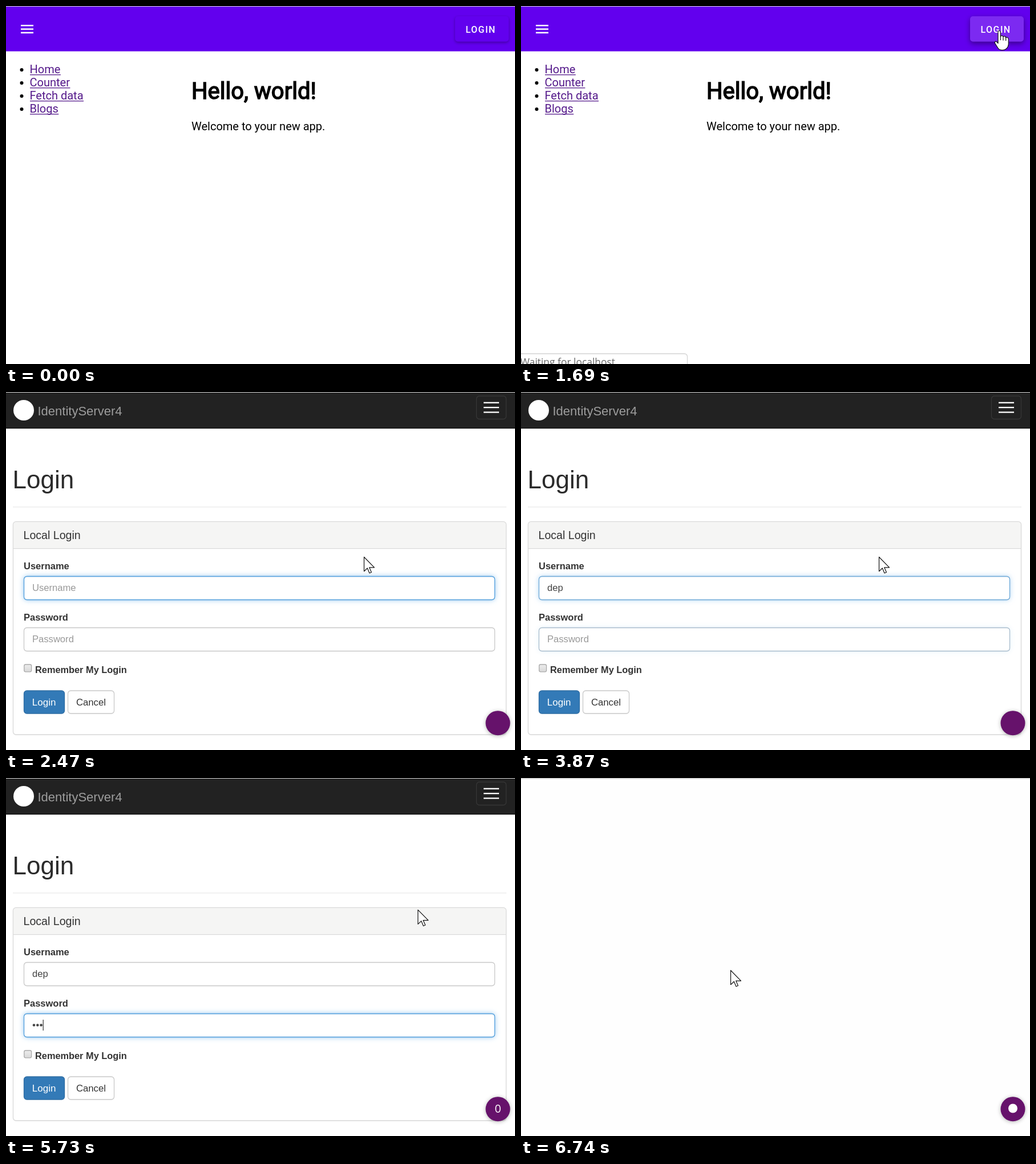
An HTML page with a canvas for the animation above (8000 ms loop, 892x628 px).

```html
<!DOCTYPE html>
<html lang="en">
<head>
<meta charset="utf-8">
<title>Login flow</title>
<style>
html, body { margin: 0; width: 100%; height: 100%; overflow: hidden; background: #fff; }
canvas { display: block; }
</style>
</head>
<body>
<canvas id="stage" width="892" height="628"></canvas>
<script>
const ctx = document.getElementById('stage').getContext('2d');
const W = 892, H = 628, LOOP = 8000;
const SANS = '"Liberation Sans", Arial, sans-serif';
const ROBOTO = 'Roboto, sans-serif';
const USER = 'dep';

// Share of a move done at time t, in n equal jumps; the first falls on a, the last on b.
function jumps(t, a, b, n) {
  if (t < a) return 0;
  return Math.min(n, Math.floor((t - a) / ((b - a) / (n - 1)) + 0.06) + 1) / n;
}
const ease = k => k * k * (3 - 2 * k);
const within = (t, a, b) => t >= a && t < b;
const ramp = (t, a, b) => Math.max(0, Math.min(1, (t - a) / (b - a)));

function rect(x, y, w, h, color) {
  ctx.fillStyle = color;
  ctx.fillRect(x, y, w, h);
}

function disc(x, y, r, color) {
  ctx.fillStyle = color;
  ctx.beginPath();
  ctx.arc(x, y, r, 0, Math.PI * 2);
  ctx.fill();
}

function text(str, x, y, font, color, spacing = 0) {
  ctx.font = font;
  ctx.fillStyle = color;
  ctx.letterSpacing = spacing + 'px';
  ctx.fillText(str, x, y);
  ctx.letterSpacing = '0px';
}

// Rounded box between two corners, with an optional border and shadow.
function box(x0, y0, x1, y1, r, fill, border, shadow) {
  ctx.save();
  ctx.beginPath();
  ctx.roundRect(x0, y0, x1 - x0, y1 - y0, r);
  if (shadow) {
    ctx.shadowColor = shadow.color;
    ctx.shadowBlur = shadow.blur;
    ctx.shadowOffsetY = shadow.dy || 0;
  }
  if (fill) {
    ctx.fillStyle = fill;
    ctx.fill();
  }
  ctx.shadowColor = 'transparent';
  if (border) {
    ctx.strokeStyle = border;
    ctx.lineWidth = 1.3;
    ctx.stroke();
  }
  ctx.restore();
}

function homePage(t) {
  rect(0, 0, W, H, '#fff');
  rect(0, 1, W, 78.5, '#6200ee');
  for (let i = 0; i < 3; i++) rect(26, 33 + i * 6.3, 22, 2.5, '#fff');

  const hover = Math.max(jumps(t, 740, 980, 4) * (t >= 740), 0);
  const press = within(t, 1520, 1840) ? 0.16 - 0.08 * ramp(t, 1600, 1690) : 0;
  box(787, 18, 881, 62.5, 5, '#6200ee', null,
    { color: `rgba(0,0,0,${0.32 + 0.1 * hover})`, blur: 5 + 5 * hover, dy: 2 + 1.5 * hover });
  box(787, 18, 881, 62.5, 5, `rgba(255,255,255,${0.085 * hover + press})`);
  text('LOGIN', 805.5, 46.5, '500 16px ' + ROBOTO, '#fff', 1.43);

  ['Home', 'Counter', 'Fetch data', 'Blogs'].forEach((label, i) => {
    const y = 118 + i * 23;
    disc(27.5, y - 6, 3, '#000');
    text(label, 41.5, y, '20px ' + ROBOTO, '#551a8b');
    rect(42, y + 2, ctx.measureText(label).width, 1.3, '#551a8b');
  });

  text('Hello, world!', 325, 163, '40px ' + ROBOTO, '#000');
  ctx.strokeStyle = '#000';
  ctx.lineWidth = 1.5;
  ctx.strokeText('Hello, world!', 325, 163);
  text('Welcome to your new app.', 325, 218, '20px ' + ROBOTO, '#000');
}

function statusBubble() {
  box(-8, 610, 291.5, 640, 5, '#fff', '#d4d4d4');
  text('Waiting for localhost...', -1, 631, '17.4px "Open Sans", sans-serif', '#6a6a6a');
}

function scrollbar() {
  rect(870, 1, 22, H, '#f1f1f1');
  rect(871, 27, 21, 560, '#c1c1c1');
  ctx.fillStyle = '#a3a3a3';
  ctx.beginPath();
  ctx.moveTo(876, 18);
  ctx.lineTo(882, 12);
  ctx.lineTo(888, 18);
  ctx.fill();
  ctx.fillStyle = '#505050';
  ctx.beginPath();
  ctx.moveTo(876, 624.5);
  ctx.lineTo(888, 624.5);
  ctx.lineTo(882, 630);
  ctx.fill();
}

function field(y, right, focus) {
  const glow = { color: `rgba(102,175,233,${0.75 * focus})`, blur: 10 };
  box(31.5, y, right - 0.5, y + 41, 5, '#fff', '#c8c8c8', focus ? glow : null);
  if (focus) box(31.5, y, right - 0.5, y + 41, 5, null, `rgba(84,164,228,${focus})`);
}

function caret(x, y) {
  rect(x, y, 1.2, 19, '#333');
}

function suggestion() {
  box(31.5, 366, 322, 447, 2, '#fff', '#c8c8c8', { color: 'rgba(0,0,0,.2)', blur: 5, dy: 1 });
  text(USER, 46, 399, '16.5px ' + SANS, '#333');
  for (let i = 0; i < 3; i++) disc(49 + i * 6.4, 424, 2.2, '#777');
}

function loginPage(t) {
  const bar = t < 1920;
  const edge = bar ? 851.5 : 877;
  const right = edge - 20;
  const bold = 'bold 16.5px ' + SANS, body = '16.6px ' + SANS;

  rect(0, 0, W, H, '#fff');
  rect(0, 1, W, 62, '#222');
  rect(0, 63, W, 1.2, '#080808');
  disc(31, 32, 18, '#fff');
  text('IdentityServer4', 55.5, 40.5, '22px ' + SANS, '#9d9d9d');
  box(edge - 52.5, 7, edge - 0.5, 47.5, 5, null, '#363636');
  for (let i = 0; i < 3; i++) rect(edge - 40, 17.6 + i * 8.4, 27, 2.3, '#fff');

  text('Login', 11.5, 169, '44px ' + SANS, '#2b2b2b');
  rect(12, 201, edge - 12, 1.3, '#eaeaea');

  box(12.5, 227.5, edge - 0.5, 601, 5, '#fff', '#d9d9d9', { color: 'rgba(0,0,0,.06)', blur: 2, dy: 1 });
  box(13, 228, edge - 1, 274, [5, 5, 0, 0], '#f5f5f4');
  rect(12, 274, edge - 12, 1.2, '#d9d9d9');
  text('Local Login', 30.5, 258, '19.6px ' + SANS, '#333');

  // Focus goes from the user field to the password, then to the button.
  const swap = jumps(t, 3870, 4100, 4);
  const userFocus = ramp(t, 1920, 2160) * (1 - swap);
  const passFocus = swap * (1 - ramp(t, 6300, 6450));

  text('Username', 31, 311, bold, '#333');
  field(323.5, right, userFocus);
  const typed = USER.slice(0, (t >= 3310) + (t >= 3480) + (t >= 3550));
  if (typed) text(typed, 46, 349, body, '#444');
  else text('Username', 46, 349, body, '#999');
  if (within(t, 2990, 3870)) caret(typed ? 46.5 + ctx.measureText(typed).width : 46.5, 335);

  text('Password', 31, 401, bold, '#333');
  field(413.5, right, passFocus);
  const dots = (t >= 4430) + (t >= 4570) + (t >= 4650);
  if (!dots) text('Password', 46, 439, body, '#999');
  for (let i = 0; i < dots; i++) disc(49 + i * 6.3, 433.5, 2.3, '#444');
  if (within(t, 4430, 5200) || within(t, 5730, 6300)) caret(46 + dots * 6.2, 424);

  const shade = ctx.createLinearGradient(0, 477, 0, 491);
  shade.addColorStop(0, '#eee');
  shade.addColorStop(1, '#d8d8d8');
  box(31.8, 478, 44.6, 490.8, 2.5, shade, '#a9a9a9');
  text('Remember My Login', 51, 493, 'bold 16.35px ' + SANS, '#333');

  const hot = t >= 6220;
  box(31.5, 524, 102.5, 564, 5, hot ? '#286090' : '#337ab7', hot ? '#204d74' : '#2e6da4');
  text('Login', 45.8, 550, '17px ' + SANS, '#fff');
  box(108.5, 524, 189.5, 564, 5, '#fff', '#c8c8c8');
  text('Cancel', 123, 550, '16.7px ' + SANS, '#333');

  if (within(t, 3310, 3550)) suggestion();
  if (bar) scrollbar();
  if (t < 2000) statusBubble();
}

function blankPage() {
  rect(0, 0, W, H, '#fefefe');
  rect(0, 1, W, 1, '#d6d6d6');
}

function badge(t) {
  ctx.save();
  ctx.shadowColor = 'rgba(0,0,0,.3)';
  ctx.shadowBlur = 7;
  ctx.shadowOffsetY = 1;
  disc(862, 580.7, 21.5, '#66126b');
  ctx.restore();
  if (t >= 6590) disc(862, 579.5, 8, '#fff');
  else if (t >= 4025) text('0', 856.4, 587, '19.5px "Open Sans", sans-serif', '#fff');
}

function outline(path, x, y) {
  ctx.save();
  ctx.translate(x, y);
  ctx.fillStyle = '#fff';
  ctx.strokeStyle = '#111';
  ctx.lineWidth = 1.2;
  ctx.lineJoin = 'round';
  ctx.fill(path);
  ctx.stroke(path);
  ctx.restore();
}

const ARROW = new Path2D('M.5.5V25.5L6.3 20 10 28.7 13.4 27.2 9.7 18.8H18.5Z');
const HAND = new Path2D('M-2 21V2.5Q-2 .5 0 .5T2.3 2.5V11Q2.8 9 4.7 9T7 11.5' +
  'Q7.5 10 9.3 10T11.7 13Q12.2 11.6 14 12T16.3 15V24Q16 28 13.5 31Q10 34.6 5 34.4' +
  'Q0 34.3-2.3 30.5L-7 23Q-8.6 20.2-6.6 19.2-5 18.6-2 22.5Z');
const KNUCKLES = new Path2D('M2.3 11V17M7 12V17.5M11.7 13V18');

// Each move: start, end, number of jumps, target point.
const MOVES = [
  [280, 740, 7, 814, 51],
  [910, 980, 2, 815, 54],
  [1140, 1290, 3, 838, 43],
  [1920, 2470, 8, 627, 289],
  [5200, 5270, 2, 759, 213],
  [5730, 6220, 7, 81, 535],
  [6440, 6740, 5, 367, 337]
];

function cursor(t) {
  if (t < 280) return;
  let x = 712, y = 470;
  for (const [a, b, n, tx, ty] of MOVES) {
    const k = ease(jumps(t, a, b, n));
    x += (tx - x) * k;
    y += (ty - y) * k;
  }
  // The hand rests at its place on the first jump of this short move.
  if (within(t, 1140, 1210)) { x = 821; y = 55; }
  if (within(t, 740, 1920) || within(t, 6220, 6440)) {
    outline(HAND, x, y);
    ctx.save();
    ctx.translate(x, y);
    ctx.strokeStyle = '#111';
    ctx.lineWidth = 1.2;
    ctx.stroke(KNUCKLES);
    ctx.restore();
  } else {
    outline(ARROW, x, y);
  }
}

function draw(t) {
  if (t < 1840) {
    homePage(t);
    if (t >= 1610) statusBubble();
  } else if (t < 6590) {
    loginPage(t);
  } else {
    blankPage();
  }
  rect(0, 0, W, 1, '#d6d6d6');
  if (t >= 2080) badge(t);
  cursor(t);
}

const start = performance.now();
function tick() {
  draw((performance.now() - start) % LOOP);
  requestAnimationFrame(tick);
}
tick();
</script>
</body>
</html>
```
